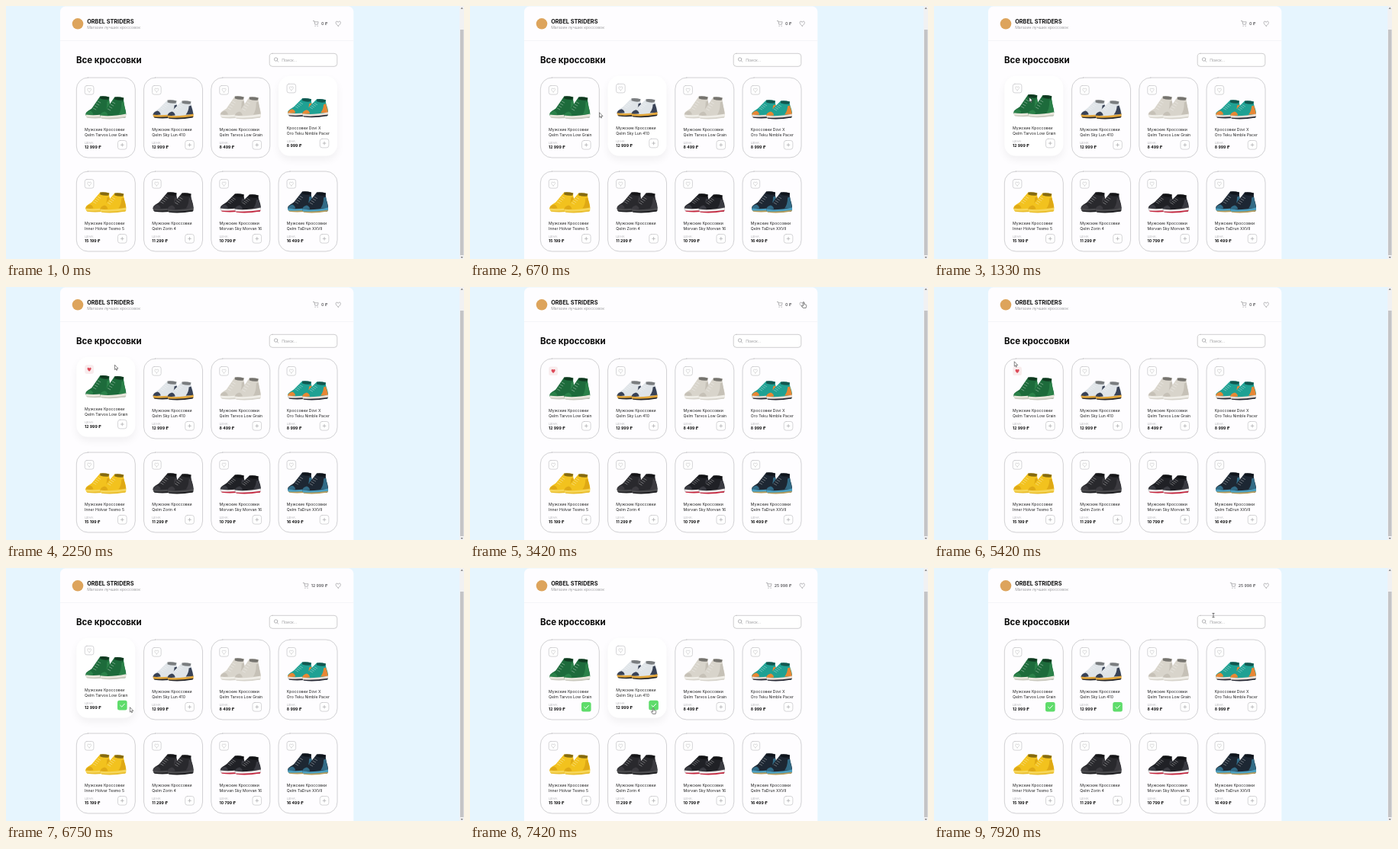
Write an HTML page with a canvas that moves like this. It is 600 px wide and 332 px high and loops after 8000 ms.

```html
<!DOCTYPE html>
<html lang="ru">
<head>
<meta charset="utf-8">
<title>Магазин кроссовок</title>
<style>
html, body { margin: 0; width: 100%; height: 100%; overflow: hidden; background: #e6f5fe; }
canvas { display: block; width: 600px; height: 332px; }
</style>
</head>
<body>
<canvas id="stage"></canvas>
<script>
const W = 600, H = 332, LOOP = 8000, FPS = 12;
const CARD_W = 77, CARD_H = 105;
const canvas = document.getElementById('stage');
const c = canvas.getContext('2d');
const ratio = window.devicePixelRatio || 1;
canvas.width = W * ratio;
canvas.height = H * ratio;

const FONT = 'Inter, "Open Sans", sans-serif';
const GREY = '#9c9c9e', LINE = '#c3c3c6', ICON = '#98989b', PAPER = '#fefdff';

const clicks = { like: 1750, saved: 3550, back: 4900, unlike: 5750, first: 6570, second: 7410 };

// colors: upper, patch, midsole, outsole
const MEN = 'Мужские Кроссовки';
const product = (b, price, collar, colors, a = MEN) => ({ a, b, price, collar, colors: colors.split(' ') });
const goods = [
  product('Qelm Tarvos Low Grain', 12999, 0, '#1d6b3b #2b8149 #e9e7dc #c9c8be'),
  product('Qelm Sky Lun 410', 12999, 5, '#dfe4e8 #394256 #e2a63a #25262b'),
  product('Qelm Tarvos Low Grain', 8499, 0, '#d8d4cb #c6c1b7 #f0eee8 #d6d3cb'),
  product('Oro Teku Nimble Pacer', 8999, 5, '#1fa193 #e78735 #e8ded6 #252733', 'Кроссовки Dovi X'),
  product('Inner Holvar Tesmo 5', 15199, 3, '#f2c21e #dfa915 #f6d65a #e9bd2c'),
  product('Qelm Zorin 4', 11299, 3, '#29292d #3c3b40 #4a4a4d #1b1b1e'),
  product('Morvan Sky Morvan 16', 10799, 5, '#202126 #3a3b42 #ecebeb #c4243d'),
  product('Qelm TaDrun XXVII', 16499, 2, '#1d2733 #326b86 #4b9fc0 #b59a58')
];

// pointer strokes: start, duration, end x, end y
const origin = [395, 150];
const strokes = [
  [80, 640, 165, 140],
  [750, 900, 109, 112],
  [2040, 1060, 437, 20],
  [3700, 890, 92.5, 70],
  [4600, 150, 96, 69],
  [4900, 800, 109, 110],
  [5900, 500, 152, 183],
  [6600, 700, 240, 184],
  [7450, 410, 366, 62]
];

const clamp = v => Math.max(0, Math.min(1, v));
const ease = k => k * k * (3 - 2 * k);
const money = n => String(n).replace(/\B(?=(\d{3})+$)/g, ' ') + ' ₽';
const cell = i => [92.3 + i % 4 * 88.25, 94 + Math.floor(i / 4) * 123];
const onSaved = t => t >= clicks.saved && t < clicks.back;

function pointerAt(t) {
  return strokes.reduce(([px, py], [start, span, x, y]) => {
    const k = ease(clamp((t - start) / span));
    return [px + (x - px) * k, py + (y - py) * k];
  }, origin);
}

function inside(i, t) {
  const [x, y] = cell(i), [px, py] = pointerAt(t);
  return px > x && px < x + CARD_W && py > y && py < y + CARD_H;
}

// hover answers a little late, then blends in
function hoverOf(i, t) {
  let sum = 0;
  for (let lag = 80; lag < 180; lag += 20) sum += inside(i, t - lag);
  return sum / 5;
}

function box(x, y, w, h, r, fill, stroke, lw = 0.7) {
  c.beginPath();
  c.roundRect(x, y, w, h, r);
  if (fill) { c.fillStyle = fill; c.fill(); }
  if (stroke) { c.strokeStyle = stroke; c.lineWidth = lw; c.stroke(); }
}

function text(s, x, y, size, color, weight = 400, align = 'left') {
  c.font = `${weight} ${size}px ${FONT}`;
  c.textAlign = align;
  c.fillStyle = color;
  c.fillText(s, x, y);
}

function shape(d, fill, stroke, lw = 0.7) {
  const p = new Path2D(d);
  if (fill) { c.fillStyle = fill; c.fill(p); }
  if (stroke) { c.strokeStyle = stroke; c.lineWidth = lw; c.stroke(p); }
}

function at(x, y, draw, scale = 1) {
  c.save();
  c.translate(x, y);
  c.scale(scale, scale);
  draw();
  c.restore();
}

function heart(x, y, scale, fill, stroke) {
  at(x, y, () => shape('M0 3 C-5 -.5 -3 -3.8 -1.2 -3 Q-.3 -2.7 0 -1.8 Q.3 -2.7 1.2 -3 C3 -3.8 5 -.5 0 3Z',
    fill, stroke), scale);
}

function shoe(x, y, top, [upper, patch, mid, sole]) {
  at(x, y, () => {
    shape(`M1 24 C1 20 5 19 9 16 L20 ${top} Q25 ${top - 1} 32 ${top + 1} C31 11 35 15 35 22 L34 27 L2 27Z`, upper);
    shape(`M20 ${top} Q25 ${top - 1} 32 ${top + 1} L31 ${top + 4} Q26 ${top + 5} 20 ${top + 3}Z`, 'rgba(0,0,0,.45)');
    shape(`M29 ${top + 7} L32 ${top + 6} Q34 17 35 23 L25 23 Q29 18 29 ${top + 7}Z`, patch);
    shape('M1 24 Q2 20 7 19 Q11 21 11 24 L1 25Z', patch);
    for (let k = 0; k < 1; k += 0.25)
      shape(`M${11 + k * 8} ${15.5 + k * (top - 12)} l3.5 2`, null, 'rgba(255,255,255,.5)', 0.7);
    shape('M1 24 Q15 26 35 22 L35 26 Q17 29.5 2 27.5Z', mid);
    shape('M2 27 Q17 28.2 35 25.3 L34 27 Q17 30 3 28.3Z', sole);
  });
}

function addButton(x, y, bought) {
  if (bought) {
    box(x - 0.5, y - 0.5, 12.6, 12.6, 2.5, '#5fdc6b');
    shape(`M${x + 3.2} ${y + 6} l2 1.9 l3.6 -3.9`, null, '#fff', 1);
  } else {
    box(x, y, 11.6, 11.6, 2.9, '#fff', LINE);
    shape(`M${x + 3.9} ${y + 5.8} h3.8 M${x + 5.8} ${y + 3.9} v3.8`, null, '#a6a6a9');
  }
}

function card(item, x, y, hover, liked, bought) {
  y -= 2.2 * hover;
  if (hover > 0) {
    c.save();
    c.shadowColor = `rgba(0,0,0,${0.055 * hover})`;
    c.shadowBlur = 11 * ratio;
    c.shadowOffsetY = 5 * ratio;
    box(x, y, CARD_W, CARD_H, 15, '#fff');
    c.restore();
  }
  c.globalAlpha = 1 - hover;
  box(x, y, CARD_W, CARD_H, 15, null, '#b9b9bb', 0.65);
  c.globalAlpha = 1;

  shoe(x + 11, y + 24.5, item.collar, item.colors);
  shoe(x + 30, y + 25.5, item.collar, item.colors);

  box(x + 11, y + 10.5, 11.6, 11.6, 2.6, liked ? '#f8eced' : '#fff', liked ? null : LINE);
  heart(x + 16.8, y + 16.5, 0.8, liked ? '#dd4a59' : null, liked ? null : '#bcbcbf');

  text(item.a, x + 10.8, y + 70.4, 5.15, '#222');
  text(item.b, x + 10.8, y + 76.8, 5.15, '#222');
  text('ЦЕНА:', x + 10.8, y + 87, 4, '#b9b9bc');
  text(money(item.price), x + 10.8, y + 92.8, 5.15, '#111', 700);
  addButton(x + 54.2, y + 82.5, bought);
}

function frame() {
  c.fillStyle = '#e6f5fe';
  c.fillRect(0, 0, W, H);
  box(71, 0.5, 384.3, 360, 7, PAPER);
  c.fillStyle = '#f1f1f2';
  c.fillRect(594.3, 0, 5.7, H);
  c.fillStyle = '#c4c4c6';
  c.fillRect(595, 31, 4.5, 296);
  shape('M597.2 1.8 l1.6 2 h-3.2Z M597.2 331 l1.6 -2 h-3.2Z', '#77777a');
}

function header(total) {
  c.fillStyle = '#f3f3f5';
  c.fillRect(71, 45, 384.3, 0.7);
  c.beginPath();
  c.arc(94, 23.3, 7.3, 0, 7);
  c.fillStyle = '#dda45c';
  c.fill();
  text('ORBEL STRIDERS', 106.2, 22.7, 7.3, '#111', 700);
  text('Магазин лучших кроссовок', 106.2, 29.5, 5.15, GREY);

  const sum = money(total);
  text(sum, 421.4, 25, 5.15, '#5c5c5f', 600, 'right');
  const left = 421.4 - c.measureText(sum).width;
  at(left - 10.6, 19.5, () => {
    shape('M0 0 h1.4 l1 4.7 h3.6 l.8 -3.4 h-5', null, ICON);
    shape('M2.2 6.3 h1 v1 h-1Z M5.3 6.3 h1 v1 h-1Z', ICON);
  });
  heart(435.2, 23.2, 1, null, ICON);
}

function shop(t) {
  text('Все кроссовки', 92, 75, 11.45, '#080808', 700);
  box(345.2, 62.3, 88.6, 17, 3.8, '#fff', '#b9b9bb');
  c.beginPath();
  c.arc(353.6, 70, 2.2, 0, 7);
  c.strokeStyle = ICON;
  c.lineWidth = 0.7;
  c.stroke();
  shape('M355.2 71.7 l1.5 1.6', null, ICON);
  text('Поиск...', 361.2, 72.6, 5.15, GREY);

  goods.forEach((item, i) => {
    const liked = i === 0 && t >= clicks.like && t < clicks.unlike;
    const bought = t >= [clicks.first, clicks.second][i];
    card(item, ...cell(i), hoverOf(i, t), liked, bought);
  });
}

function saved() {
  box(92.3, 63.3, 11.4, 11.4, 3, '#fff', LINE);
  shape('M98.8 67 l-2 2 l2 2', null, '#a6a6a9');
  text('Мои Закладки', 110.3, 73.2, 11.45, '#080808', 700);
  card(goods[0], 92.3, 90.6, 0, true, false);
}

const cursors = {
  arrow: () => shape('M0 0 L0 6.6 L1.5 5.3 L2.5 7.6 L3.5 7.1 L2.5 4.9 L4.5 4.8Z', '#fff', '#222', 0.6),
  hand: () => shape('M-.8 0 Q0 -1 .8 0 V3 L3.7 3.7 Q4.4 4 4.2 5 L3.5 8.3 H-.8 L-3 4.9 Q-2.3 4 -.8 5.2Z', '#fff', '#222', 0.6),
  beam: () => shape('M-1.3 -2.8 H1.3 M0 -2.8 V2.8 M-1.3 2.8 H1.3', null, '#333', 0.7)
};

function cursorFor(x, y, t) {
  const near = (bx, by) => Math.hypot(x - bx, y - by) < 5;
  const onCard = goods.some((_, i) => {
    const [cx, cy] = cell(i);
    return near(cx + 16.8, cy + 16.3) || near(cx + 60, cy + 88.3);
  });
  if (near(435.2, 23.2) || (onSaved(t) ? near(98, 69) : onCard)) return 'hand';
  const onSearch = x > 345 && x < 434 && y > 61 && y < 80;
  return onSearch && !onSaved(t) ? 'beam' : 'arrow';
}

function pointer(t) {
  if (t < 80) return;
  const [x, y] = pointerAt(t);
  at(x, y, cursors[cursorFor(x, y, t)], 0.9);
}

function draw(now) {
  const step = Math.floor((now % LOOP + 3.5) * FPS / 1000) % (LOOP * FPS / 1000);
  const t = step * 1000 / FPS;
  c.setTransform(ratio, 0, 0, ratio, 0, 0);
  c.lineJoin = c.lineCap = 'round';
  frame();
  header(goods[0].price * (t >= clicks.first) + goods[1].price * (t >= clicks.second));
  if (onSaved(t)) saved();
  else shop(t);
  pointer(t);
}

const start = performance.now();
function loop() {
  draw(performance.now() - start);
  requestAnimationFrame(loop);
}
loop();
</script>
</body>
</html>
```
